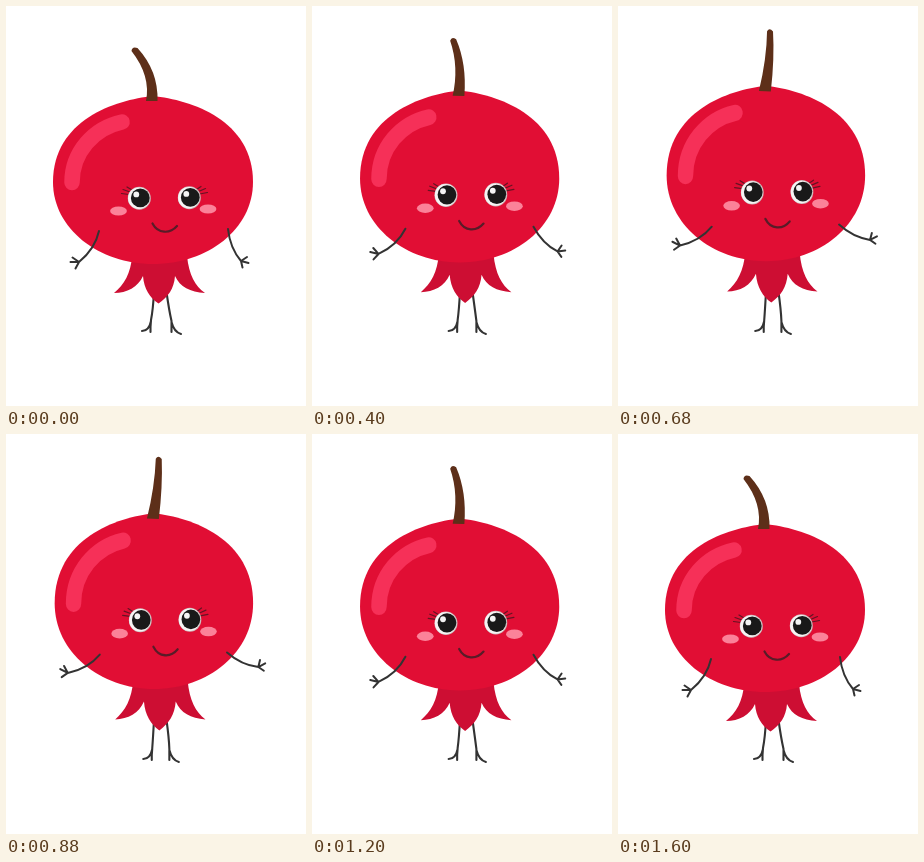
Animation, 300 px wide and 400 px high, one loop 1680 ms. Source, as an HTML page with a canvas:

```html
<!DOCTYPE html>
<html lang="en">
<head>
<meta charset="utf-8">
<title>Waving berry</title>
<style>
  html, body { margin: 0; width: 100%; height: 100%; overflow: hidden; background: #fff; }
  canvas { display: block; }
</style>
</head>
<body>
<canvas id="stage" width="300" height="400"></canvas>
<script>
const ctx = document.getElementById('stage').getContext('2d');
const LOOP = 1680, SWING = 1600, STEP = 40;
const MIDDLE = 147, GROUND = 322, STRETCH = 0.047, SQUEEZE = 0.008;
const RED = '#e10e34', DARK_RED = '#cd0e33', SHINE = '#f63058', BLUSH = '#fb8299';
const INK = '#333333', BROWN = '#5d2f19', LASH = '#641423', MOUTH = '#581c28';

const lerp = (a, b, p) => a + (b - a) * p;
const rad = deg => deg * Math.PI / 180;

function fill(path, color) {
  ctx.fillStyle = color;
  ctx.fill(new Path2D(path));
}

function line(path, color, width) {
  ctx.strokeStyle = color;
  ctx.lineWidth = width;
  ctx.stroke(new Path2D(path));
}

function oval(x, y, rx, ry, color) {
  ctx.fillStyle = color;
  ctx.beginPath();
  ctx.ellipse(x, y, rx, ry, 0, 0, Math.PI * 2);
  ctx.fill();
}

function legs(p) {
  const left = lerp(0, 1.3, p), right = lerp(0, -2.2, p);
  line(`M148 286 Q147 304 ${145 + left} 314 L${144.5 + left} 321
        M${145 + left} 315 Q${143 + left} 325 ${136 + left} 325
        M${144.5 + left} 320 L${144.5 + left} 326`, INK, 2.1);
  line(`M160.5 286 Q163 304 ${165.5 + right} 315 L${165.5 + right} 326
        M${165.5 + right} 316 Q${168 + right} 326 ${175 + right} 328`, INK, 2.1);
}

function calyx() {
  fill(`M126 250 C125 267 118 279 108 287 C121 287 132 281 137 270
        C138 283 144 292 152.5 297.5 C162 291 168 283 169 270
        C174 281 184 286 199 287 C189 280 183 269 181 250 Z`, DARK_RED);
}

function body() {
  fill(`M147 90 C185 94 247 114 247 176 C247 223 202 258 147 258
        C93 258 47 223 47 176 C47 114 109 94 147 90 Z`, RED);
  line('M116 116 C88 122 66 146 66 176.5', SHINE, 15.5);
}

function eye(x, y) {
  oval(x, y, 11.5, 11.5, '#cdbcbc');
  oval(x - 0.4, y, 10.8, 10.8, '#f6f4f4');
  oval(x + 1, y - 0.3, 9.4, 9.4, '#191919');
  oval(x - 3, y - 3.8, 2.9, 2.9, '#f4f4f4');
}

function face() {
  oval(112.5, 205, 8.4, 4.6, BLUSH);
  oval(202, 203, 8.4, 4.6, BLUSH);
  line(`M123 188.5 L115.5 187.5 M124 186 L117 183.5
        M126 184 L121 181`, LASH, 1.2);
  line(`M193.5 188 L201.5 186.5 M192.5 185.5 L199.5 182.5
        M190.5 183.5 L195 180.5`, LASH, 1.2);
  eye(133.3, 192.2);
  eye(183.3, 191.7);
  line('M146.5 217.5 C152 228 164 228 171 220', MOUTH, 2.2);
}

// The foot of the stem stays put while its tip bends from left to right.
function stem(p) {
  const at = (x0, y0, x1, y1) => `${146 + lerp(x0, x1, p)} ${95 + lerp(y0, y1, p)}`;
  fill(`M140 95 Q${at(-1, -25, 2, -31)} ${at(-20.5, -50, 3.5, -57.5)}
        Q${at(-20, -55, 6, -61.5)} ${at(-14.5, -53, 9.5, -57)}
        Q${at(6.5, -30, 10, -31)} ${at(5.5, 0, 6, 0.5)} Z`, BROWN);
}

// The arm turns about its shoulder, which rides on the stretching body.
function arm(x, y, degrees, path) {
  ctx.save();
  ctx.translate(x, y);
  ctx.rotate(rad(degrees));
  line(path, INK, 2);
  ctx.restore();
}

function draw(p) {
  ctx.fillStyle = '#fff';
  ctx.fillRect(0, 0, 300, 400);
  ctx.lineCap = ctx.lineJoin = 'round';

  const scale = 1 + STRETCH * p;
  const lift = y => GROUND + (y - GROUND) * scale;

  legs(p);
  ctx.save();
  ctx.translate(MIDDLE + 0.9 * Math.sqrt(p), GROUND);
  ctx.scale(1 - SQUEEZE * p, scale);
  ctx.translate(-MIDDLE, -GROUND);
  calyx();
  body();
  face();
  stem(p);
  ctx.restore();

  arm(93 + 0.8 * p, lift(225), 28 * p,
    'M0 0 Q-4 18 -20 31 L-28.5 31 M-20 31 L-26.5 26.5 M-20 31 L-23.5 37.5');
  arm(222 - p, lift(223), -44 * p,
    'M0 0 Q2 19 13 32 L20.5 34 M13 32 L14.5 38.5 M13 32 L19 28');
}

const start = performance.now();

function tick() {
  const elapsed = (performance.now() - start) % LOOP;
  const time = Math.floor(elapsed / STEP) * STEP;
  const phase = Math.min(time, SWING) / SWING;
  draw((1 - Math.cos(phase * Math.PI * 2)) / 2);
  requestAnimationFrame(tick);
}

tick();
</script>
</body>
</html>
```
